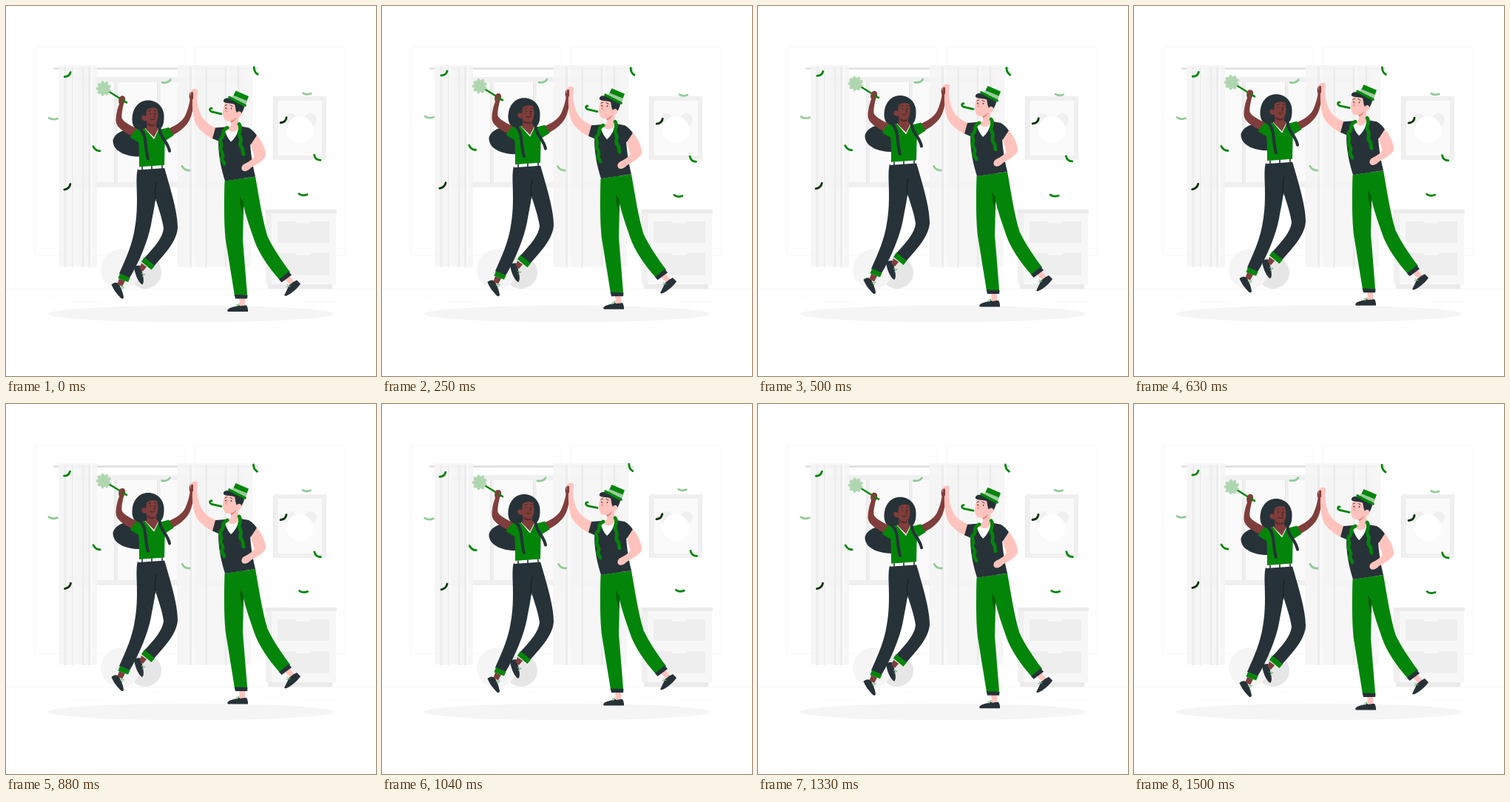
Animation of 500x500 px, one loop 1540 ms. Source, as an HTML page:

```html
<!DOCTYPE html>
<html lang="en">
<head>
<meta charset="utf-8">
<title>Party dance</title>
<style>
  html, body { margin: 0; width: 100%; height: 100%; overflow: hidden; background: #fff; }
  svg { display: block; width: 100%; height: 100%; }
  .dark { fill: #263238; }
  .green { fill: #03850a; }
  .brown { fill: #7f3e3b; }
  .pink { fill: #ffc3bd; }
  .white { fill: #fff; }
  .line { fill: none; stroke-linecap: round; stroke-linejoin: round; }
  .lace { stroke: #6bb56b; stroke-width: 1; }
</style>
</head>
<body>
<svg viewBox="0 0 500 500">
  <g id="room">
    <g fill="none" stroke="#f8f8f8">
      <rect x="39.5" y="55.5" width="203" height="282" rx="1"/>
      <rect x="255.5" y="55.5" width="203" height="282" rx="1"/>
    </g>
    <path d="M0 382.5H500" stroke="#f4f4f4"/>
    <path d="M83 399.5h48M190 389.5h26M352 395.5h16M397 399.5h51M56 392.5h10" stroke="#f9f9f9"/>

    <rect x="89" y="96" width="232" height="149" fill="#f0f0f0"/>
    <path class="white" d="M96 103H314V238H96Z"/>
    <path d="M97 103h50v135H97zM152 103h53v135h-53zM210 103h53v135h-53z" fill="#fafafa"/>
    <path d="M149 103V238M206.500 103V238M264 103V238" stroke="#efefef" stroke-width="5"/>
    <path d="M147 103V238M204.500 103V238M262 103V238" stroke="#e3e3e3"/>
    <path d="M64 84.500H340" stroke="#dedede" stroke-width="2.600"/>
    <g fill="#f5f5f5" fill-opacity=".88">
      <path d="M71 80H123V352.500L71 352Z"/>
      <path d="M231 80H334L331 352.500H231Z"/>
    </g>
    <path d="M80 82V353M90.500 82V353M104 82V353M112.500 82V353M249.500 82V353M270.500 82V353M297 82V353M314 82V353"
      stroke="#ececec" stroke-width="2.600"/>
    <path d="M92 82V353M116 82V353M253 82V353M300 82V353" stroke="#fafafa" stroke-width="2"/>

    <rect x="361" y="122" width="72" height="86" fill="#f0f0f0"/>
    <path d="M361.500 122V208" stroke="#e6e6e6"/>
    <rect x="368" y="128" width="59" height="74" fill="#fafafa"/>
    <circle cx="384.500" cy="154" r="9" fill="#f0f0f0"/>
    <circle cx="411" cy="154" r="9" fill="#f0f0f0"/>
    <circle class="white" cx="397" cy="167" r="18"/>

    <rect x="351" y="280" width="95" height="96" fill="#f7f7f7"/>
    <rect x="351" y="280" width="8" height="96" fill="#f0f0f0"/>
    <rect x="350" y="275" width="97" height="5" fill="#ebebeb"/>
    <rect x="354" y="376" width="87" height="6" fill="#ebebeb"/>
    <path d="M367 291h70v29h-70zM367 334h70v29.500h-70z" fill="#eee"/>
    <path d="M391 291h21l-1 3h-19zM391 334h21l-1 3h-19z" fill="#f7f7f7"/>

    <circle cx="188" cy="360" r="22" fill="#e6e6e6"/>
    <circle cx="155" cy="356" r="27" fill="#f5f5f5"/>
    <ellipse cx="249.500" cy="416" rx="193.500" ry="11.300" fill="#f5f5f5"/>
  </g>

  <g id="confetti" class="line" stroke-width="2.800"></g>

  <g id="dancers">
    <g id="woman">
      <path class="dark" d="M180 166C163 164 147 170 144.500 181C144 196 163 204 184 203L188 170Z"/>
      <path class="dark" d="M170.500 154C170 137 180 127 192 127C205 127 213.500 137 213.500 149C213.500 158 212 163 208 166L180 168C173 166 171 160 170.500 154Z"/>

      <path class="line" d="M138 114.500L163 130" stroke="#03850a" stroke-width="2.400"/>
      <path id="clover" fill="#b2d8b2" stroke="#a3cfa3" stroke-width=".6"/>
      <path class="brown" d="M172 176C161 171 149 164 148.500 155C148.500 146 151 137 153 132C151 127 153 121.500 156 121C160 120 162 124 161 127C160.500 130 159 131 158.500 134C157 141 155.500 149 157 152C161 158 171 162 178 166Z"/>
      <path class="line" d="M158 127L163 130" stroke="#03850a" stroke-width="2.400"/>
      <path class="brown" d="M213 167C226 164 238 156 242 148C246 139 248 131 248.500 126C246.500 121 248 115 252 114.500L255 118C254.500 122 254 126 253.500 130C252.500 142 250 151 246 157C240 166 229 173 219 177Z"/>

      <path class="dark" d="M173 351L181 350C183 354 184 358 185 364C186.500 370 186 375 184 376C178 372 173.500 360 173 351Z"/>
      <path class="brown" d="M183 347L190 352L185 358L180.500 354Z"/>
      <path class="dark" d="M142.500 376C146 373 150 372 153 376C156 381 158 387 159 393C158.500 396 156 395.500 154 393C149 388 145 382 142.500 376Z"/>
      <path class="brown" d="M153 368L161 371L157 378.500L150.500 375Z"/>
      <path class="line lace" d="M154 380l5-1M156 383l3-3M183 361l4 1M184 365l4-3"/>

      <path class="dark" d="M196 222L214 218C222 246 232 277 232 299C231 318 213 336 200.500 350.500L187 340C201 325 212 312 213 300C211 286 206 273 201.500 258Z"/>
      <path class="green" d="M187 339L201 350.500L196.500 356L183 345Z"/>
      <path class="dark" d="M178 219.500L214 217.500C213 232 205 242 203 251C202 266 199 278 196 295C192 316 180 346 167 367L153 361C162 341 171 321 174 300C178 279 177 257 176.500 240C176.500 231 176.500 225 178 219.500Z"/>
      <path class="line" d="M203 238C201 247 201 254 202 263" stroke="#11191d" stroke-width=".8"/>
      <path class="green" d="M154 361L167.500 367L165 372.500L151.500 367.500Z"/>

      <path class="green" d="M176 167L188 165L206 165L215 167C216 175 215 183 214.500 190L214 215L180 217.500C180 203 180 191 179 182Z"/>
      <path class="green" d="M175.500 166L167.500 177L181 185L186 168Z"/>
      <path class="green" d="M207 167L220 163.500L226.500 174.500L213 183Z"/>
      <path class="white" d="M187.500 165L200 179.500L207 165Z"/>
      <path class="white" d="M178.500 217L214 214.500L214.500 218.500L178.500 221Z"/>
      <path d="M184 216.500v5M197 215.500v5M211 214.500v5" stroke="#263238" stroke-width="1.600"/>

      <path class="brown" d="M190 153L190.500 163L188.500 165.500L200 177L206 165.500L203 162.500L203 156Z"/>
      <path d="M191 157C195 160 199 161 202 158L202 160.500C198 164 193 162 191 159Z" fill="#5e2b2a"/>
      <path class="brown" d="M190 140C194 137 199 136 204 138C206.500 146 206 155 202 158.500C197 161 191.500 158 189.500 154.500C185.500 155.500 182.500 152 183.500 149C185 146.500 188 147 189 149Z"/>
      <path class="line" d="M193 141.500l3-1M200.500 140.500l2.500 1M200 145l1.500 4l-2 .5" stroke="#3a1f20" stroke-width=".8"/>
      <circle class="dark" cx="195" cy="145" r=".9"/>
      <circle class="dark" cx="202" cy="145" r=".9"/>
      <path class="line" d="M195 152.500q3 2 6-.5" stroke="#3a1f20" stroke-width=".9"/>
      <path class="line" d="M181 165C191 175 187 190 192 206" stroke="#263238" stroke-width="4"/>
      <path class="line" d="M207 162C208 179 218 181 221 195.500" stroke="#263238" stroke-width="4"/>
    </g>

    <g id="man">
      <path class="pink" d="M251 113C255 111 259 111 259 114.500L258 123C259 135 261 147 269 154.500C274 160 281 163 286 165L281 179.500C270 175 258 165 255 155C252 145 251.500 133 252 126C249.500 122 248 116 251 113Z"/>
      <path class="line" d="M251.500 117v7" stroke="#7f3e3b" stroke-width="3"/>

      <path class="dark" d="M376 390.500C380 383 382 377 385 374L393 370L398 375C394 381 385 389 378 391.500Z"/>
      <path class="pink" d="M377 369L383 364L389 371.500L384 376Z"/>
      <path class="dark" d="M299 411C300 407 309 406 315 404L325 404C327 407 327 410 327 412.500L300 412.500Z"/>
      <path class="pink" d="M315 394H323V404L316 405Z"/>
      <path class="line lace" d="M311 404l4-2M312 406l3-3M379 379l5-1M380 376l3 3"/>

      <path class="green" d="M312 234L337 230C342 258 346 286 353.500 311C360 325 373 345 384 359L371 371C354 352 341 332 335.500 316C330 300 324 283 320 266Z"/>
      <path class="green" d="M295.500 236L322 232C321 258 321 285 320 316C322 340 324 365 326 390L309 391L297.500 320C294.500 300 294.500 262 295.500 236Z"/>
      <path d="M316 257C316 268 318 276 320.500 282L321 265Z" fill="#006000"/>
      <path class="dark" d="M308.500 389.500L326.500 390L326 395L310 395Z"/>
      <path class="dark" d="M382 358.500L386 363L372.500 373L369 369Z"/>

      <path class="dark" d="M283 164L296 163L317 162L328 164C333 167 336 170 339 174.500L331 187L330 186C331 202 334 218 337 230L296 236C291 220 287 203 287 182L279 178.500Z"/>
      <path class="pink" d="M331 186.500L339 174.500C346 181 352 196 351 202C348 209 338 214 331 218C328 222 322 224 320 222C316.500 219 319 214 323 212.500C328 210 334 206 335.500 203C334 197 332 192 331 186.500Z"/>
      <path class="white" d="M295 165C297 173 300 179 304 183C309 179 313 172 315 164Z"/>
      <path class="pink" d="M304 150L314 144L314 164C311 171 302 171 298 164L304 161Z"/>
      <path class="line" d="M299 164C290 168 296 174 291 178C286 182 294 187 290 191C288 196 296 199 292 204C290 208 295 210 295 213M315 159C320 165 312 171 316 176C320 181 314 186 318 190C322 194 319 196 321 200"
        stroke="#03850a" stroke-width="4.800"/>

      <path class="dark" d="M295 126C298 123 320 127 322 136C320 143 317 148 313 148L305 135Z"/>
      <path class="pink" d="M296 130C292 140 292 150 296.500 153.500C301 157 308 154 311 149C315 151 319 148 318 144C317 141 313 141 312 144C310 141 310 136 309 132C304 128 299 129 296 130Z"/>
      <path class="dark" d="M294 129C293 124 299 123 304 125L310 133C304 130 299 132 294 129Z"/>
      <path class="line" d="M296 134l2.500-1M303 133.500l3 1.500" stroke="#263238" stroke-width=".9"/>
      <circle class="dark" cx="297" cy="137.500" r=".9"/>
      <circle class="dark" cx="304.500" cy="138" r=".9"/>
      <path class="line" d="M299 138l-2.500 4l2 .5" stroke="#ed847e" stroke-width="1"/>
      <path d="M303 155C307 154 309 152 311 150L311 151C309 155 306 157 304 157Z" fill="#ed847e"/>
      <path class="line" d="M291 145.300L278 142.500C274.500 141 275 137.500 278 137.800" stroke="#03850a" stroke-width="2.800"/>

      <path class="green" d="M310.500 114L328 121.500L323 134L305 125Z"/>
      <path d="M307 120L325.500 127.500L323.500 132.500L305 125Z" fill="#99cc99"/>
      <path class="line" d="M302 123Q312 128.500 323 134" stroke="#03850a" stroke-width="3.600"/>
    </g>
  </g>
</svg>
<script>
  const LOOP = 1540, LEAD = 40;
  const GREEN = '#03850a', LIGHT = '#92cb97', DEEP = '#043304';
  const $ = id => document.getElementById(id);
  const confetti = $('confetti'), dancers = $('dancers');

  const curls = [
    [GREEN, 'M79 96Q85.500 96 87 90'],
    [LIGHT, 'M58 151.500Q63 155 69.500 152.500'],
    [GREEN, 'M118 190Q121 196 127 196'],
    [DEEP, 'M79 248.500Q86 247 87 241'],
    [LIGHT, 'M211 103.500Q219 104.500 222 99.500'],
    [LIGHT, 'M238 216.500Q241 222.500 248 222'],
    [GREEN, 'M335 82.500Q335 89 340 92'],
    [LIGHT, 'M401.500 117.500Q406 120.500 412 118'],
    [DEEP, 'M371 157.500Q378 157 379 150.500'],
    [GREEN, 'M416.500 201Q418 208 425 208'],
    [GREEN, 'M396 253.500Q400 257 407 254.500']
  ];
  confetti.innerHTML = curls.map(([color, d]) => `<path stroke="${color}" d="${d}"/>`).join('');

  // Clover head: a ring of petals with veins
  function clover(cx, cy, petals) {
    const at = (r, i) => {
      const a = i * 2 * Math.PI / petals;
      return `${(cx + r * Math.cos(a)).toFixed(2)} ${(cy + r * Math.sin(a)).toFixed(2)}`;
    };
    let edge = 'M' + at(7.3, 0), veins = '';
    for (let i = 0; i < petals; i++) {
      edge += `Q${at(13.5, i + .5)} ${at(7.3, i + 1)}`;
      veins += `M${at(2, i + .5)}L${at(7, i + .5)}`;
    }
    return edge + 'Z' + veins;
  }
  $('clover').setAttribute('d', clover(132, 111, 9));

  // Triangle wave: 0 at the ends, 1 in the middle
  const tri = p => 1 - Math.abs(2 * (p - Math.floor(p)) - 1);

  function draw() {
    const p = (performance.now() + LEAD) % LOOP / LOOP;
    const lift = 10 * tri(p);
    const swing = 2 * tri(p + .25) - 1;
    dancers.setAttribute('transform', `translate(0 ${(1 - lift).toFixed(3)})`);
    confetti.setAttribute('transform', `rotate(${swing.toFixed(4)} 241 169)`);
    requestAnimationFrame(draw);
  }
  draw();
</script>
</body>
</html>
```
